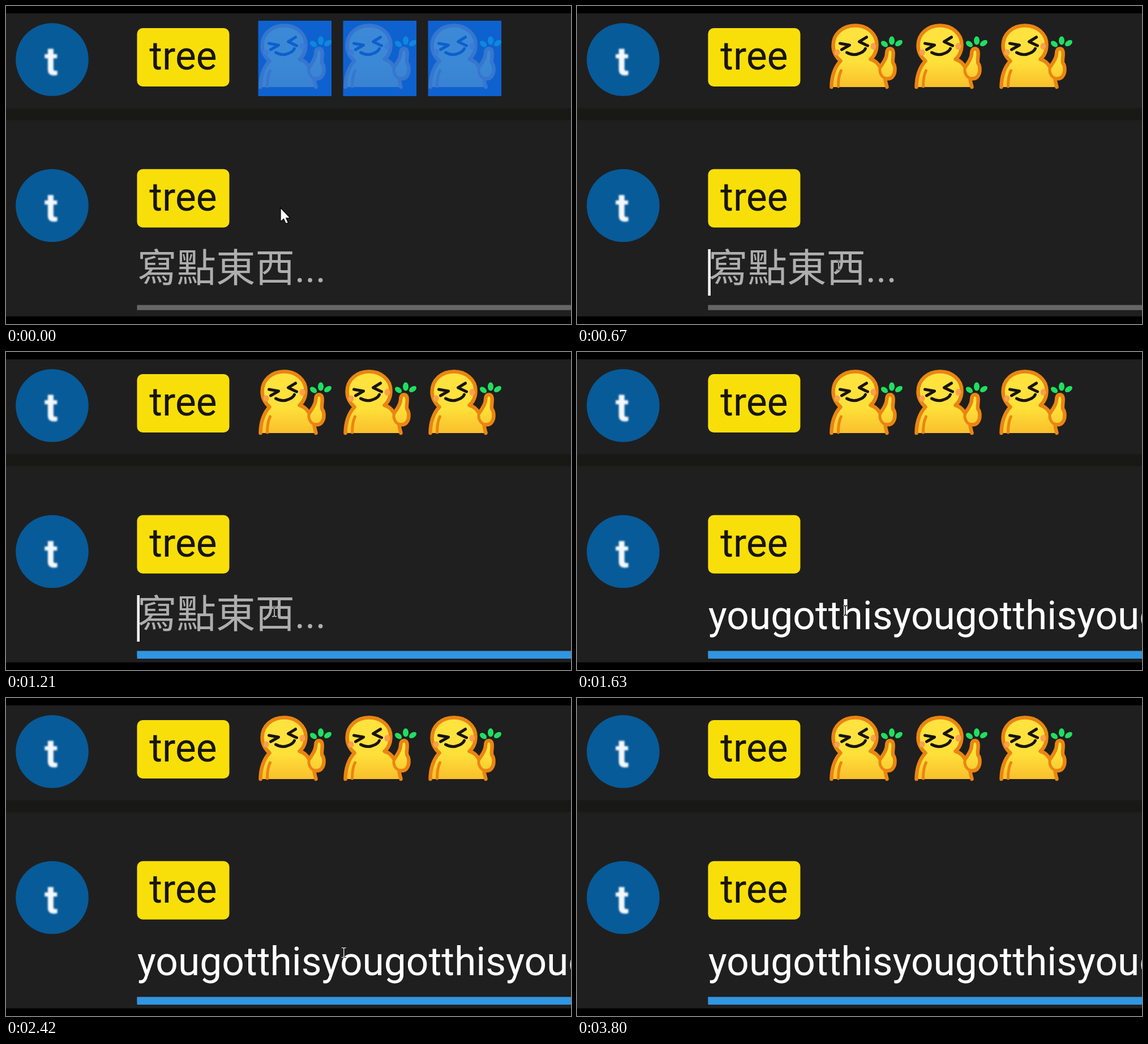
Recreate the animation shown at these times as an HTML page. Size 998 px wide and 561 px high, loop 3880 ms.

```html
<!DOCTYPE html>
<html lang="zh-Hant">
<head>
<meta charset="utf-8">
<title>Chat input</title>
<style>
  html, body { margin: 0; width: 100%; height: 100%; overflow: hidden; background: #000; }
  svg { display: block; width: 998px; height: 561px; }
  text { font: 400 69.5px Roboto, "Noto Sans CJK TC", sans-serif; }
  .initial { font-weight: 700; font-size: 71px; fill: #f4f8fc; text-anchor: middle; filter: blur(1.5px); }
  .name { fill: #17150a; text-anchor: middle; }
  #beam { mix-blend-mode: difference; }
</style>
</head>
<body>
<svg viewBox="0 0 998 561">
  <defs>
    <linearGradient id="skin" x1="0" y1="0" x2="0" y2="1">
      <stop offset="0" stop-color="#ffe340"/>
      <stop offset=".6" stop-color="#fee03a"/>
      <stop offset="1" stop-color="#f9bf2c"/>
    </linearGradient>
    <g id="avatar">
      <circle cx="81.5" cy="94.5" r="64.3" fill="#075b99"/>
      <text class="initial" x="80" y="122">t</text>
    </g>
    <g id="badge">
      <rect x="231.5" y="39" width="163" height="103" rx="10" fill="#f9df09"/>
      <text class="name" x="313" y="112">tree</text>
    </g>
    <g id="emoji" fill="none" stroke-linecap="round" stroke-linejoin="round">
      <path fill="url(#skin)" stroke="#ea8512" stroke-width="6.5" d="M4 117C4 100 9 82 20 71C11 63 7 54 7 44C7 23 24 8.5 46 8.5C67 8.5 84 23 84 42
        C84 54 80 62 73 68C81 70 86 75 90 82C94 76 99 70 101 62L102 54C104 47 112 48 113 55C114 63 111 70 113 75
        C117 80 117 91 113 97C110 102 105 103 99 102C99 108 101 112 102 117"/>
      <path stroke="#ea8512" stroke-width="5" d="M21 88C17 96 16 107 16 116M90 82C88 90 91 98 99 102"/>
      <g fill="#fba04c">
        <ellipse cx="14" cy="56" rx="5" ry="5.5"/>
        <ellipse cx="78" cy="45" rx="5" ry="6"/>
      </g>
      <path stroke="#17140c" stroke-width="5" d="M19 40L36 43L22 51M66 29L53 37L68 44M31 56Q43 63 55 57Q62 54 64 49"/>
      <g fill="#20df62">
        <ellipse cx="97.5" cy="41" rx="6.8" ry="4.6" transform="rotate(38 97.5 41)"/>
        <ellipse cx="110.5" cy="35" rx="5" ry="7.6"/>
        <ellipse cx="123" cy="39.5" rx="7.2" ry="4.6" transform="rotate(-35 123 39.5)"/>
      </g>
    </g>
  </defs>

  <rect width="998" height="561" fill="#000"/>
  <rect y="13" width="998" height="534.5" fill="#1f1f1f"/>
  <rect y="180.5" width="998" height="21" fill="#181817"/>

  <use href="#avatar"/>
  <use href="#badge"/>
  <use href="#avatar" y="257.5"/>
  <use href="#badge" y="248.7"/>

  <use href="#emoji" x="445.5" y="26"/>
  <use href="#emoji" x="595.5" y="26"/>
  <use href="#emoji" x="745.5" y="26"/>
  <g id="selection" fill="rgb(11,115,253)" fill-opacity=".8">
    <rect x="445.5" y="26" width="129.5" height="133"/>
    <rect x="595.5" y="26" width="129.5" height="133"/>
    <rect x="745.5" y="26" width="129.5" height="133"/>
  </g>

  <text id="hint" x="232" y="487" fill="#aeaeae">寫點東西...</text>
  <text id="message" x="232" y="488.5" fill="#fff"></text>
  <rect id="caret" x="231.5" y="429" width="4.5" height="82" fill="#fff"/>

  <rect x="231.5" y="527.5" width="767" height="9" fill="#666"/>
  <rect id="focus" y="527.5" height="13.5" fill="#3096e2"/>

  <path id="arrow" fill="#fff" stroke="#000" stroke-width="1.2" d="M0 0V24.5L5.5 19.5L9.3 28L13.5 26.2L9.8 18H17Z"/>
  <path id="beam" fill="none" stroke="#fff" stroke-width="1.4" d="M-4 -8.5H-1.5L0 -7.5L1.5 -8.5H4M0 -7.5V7.5M-4 8.5H-1.5L0 7.5L1.5 8.5H4"/>
</svg>
<script>
  const LOOP = 3880, CLICK = 670, PASTE = 1400, LEAVE = 2620;
  const LINE = { left: 231.5, center: 1040, start: 690, length: 260 };

  // Pointer path: time, x, y
  const PATH = [
    [0, 485, 356], [170, 485, 356], [380, 469, 433], [520, 462, 457],
    [700, 462, 457], [1000, 474, 458], [1210, 474, 458], [1630, 474, 456],
    [2290, 474, 454], [2420, 595, 449], [2600, 905, 464]
  ];

  const $ = id => document.getElementById(id);
  const show = (id, on) => { $(id).style.display = on ? "" : "none"; };
  const clamp = v => Math.min(1, Math.max(0, v));

  $("message").textContent = "yougotthis".repeat(3);

  function pointer(t) {
    const i = PATH.findIndex(p => p[0] > t);
    if (i < 0) return PATH[PATH.length - 1].slice(1);
    const [t0, x0, y0] = PATH[i - 1], [t1, x1, y1] = PATH[i];
    const k = (t - t0) / (t1 - t0);
    return [x0 + (x1 - x0) * k, y0 + (y1 - y0) * k];
  }

  function draw(t) {
    show("selection", t < CLICK);
    show("caret", t >= CLICK && t < PASTE);
    show("hint", t < PASTE);
    show("message", t >= PASTE);

    // The focus line opens outwards from the middle of the field.
    const grow = 1 - (1 - clamp((t - LINE.start) / LINE.length)) ** 3;
    const x = LINE.center - (LINE.center - LINE.left) * grow;
    $("focus").setAttribute("x", x);
    $("focus").setAttribute("width", Math.max(0, 998 - x));

    const [px, py] = pointer(t);
    const overInput = py > 420;
    show("arrow", !overInput);
    show("beam", overInput && t < LEAVE);
    for (const id of ["arrow", "beam"]) $(id).setAttribute("transform", `translate(${px} ${py})`);
  }

  const begin = performance.now();
  function tick() {
    draw((performance.now() - begin) % LOOP);
    requestAnimationFrame(tick);
  }
  tick();
</script>
</body>
</html>
```
